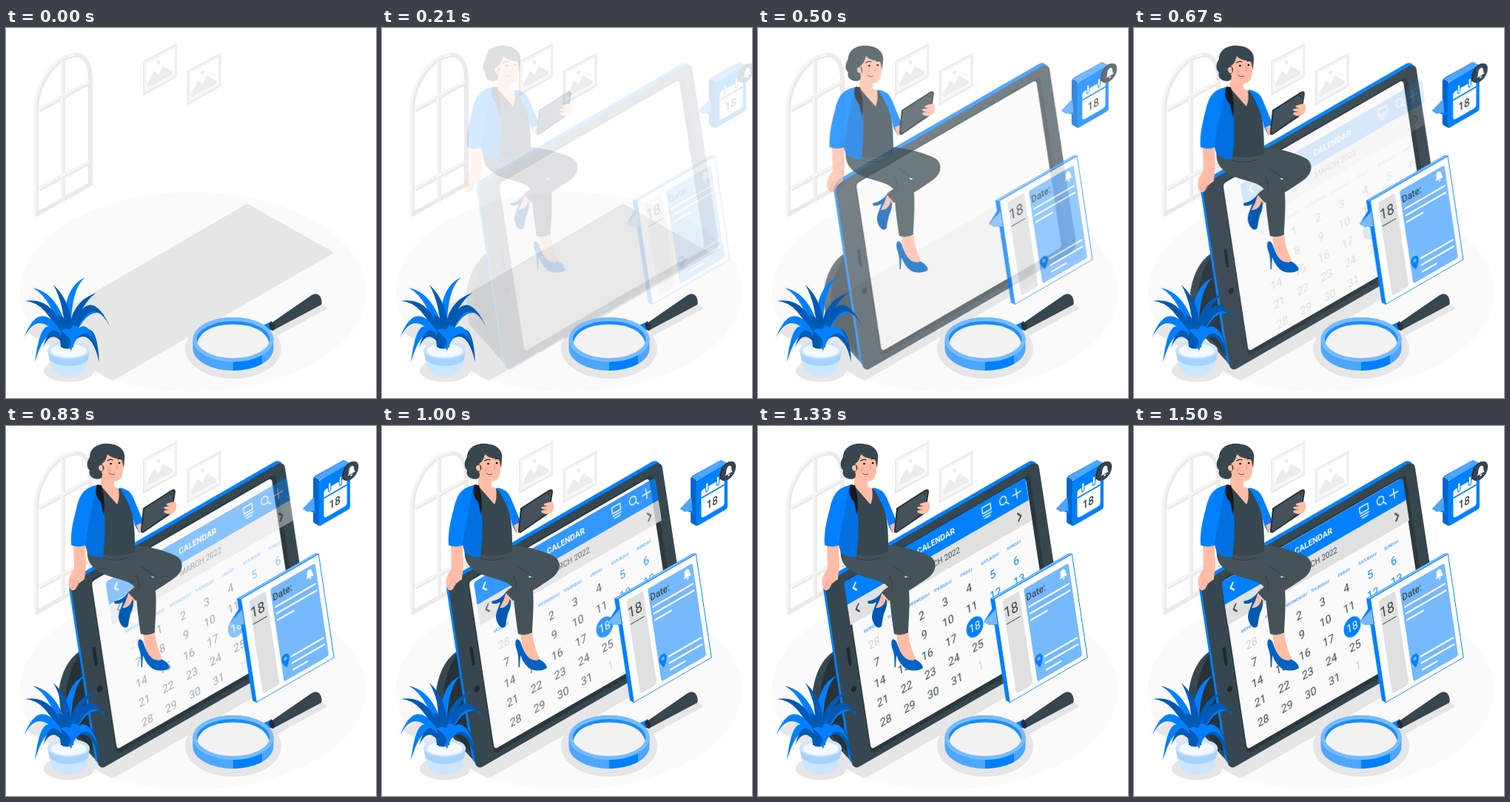
Animation, 500 px wide and 500 px high, one loop 1540 ms. Source, as an HTML page:

```html
<!DOCTYPE html>
<html lang="en">
<head>
<meta charset="utf-8">
<title>Calendar</title>
<style>
html, body { margin: 0; width: 100%; height: 100%; overflow: hidden; background: #fff; }
svg { display: block; width: 100%; height: 100%; font-family: Roboto, Inter, sans-serif; }
text { text-anchor: middle; dominant-baseline: central; fill: #37474f; }
.line { fill: none; stroke-linecap: round; stroke-linejoin: round; }
.b { fill: #0080ff; } .n { fill: #0059b3; } .d { fill: #37474f; } .c { fill: #435359; }
.s { fill: #ffbda7; } .l { fill: #77b9ff; } .w { fill: #fff; }
.in { animation: slide 1.54s linear infinite; }
.device { animation: device 1.54s linear infinite; }
.screen { animation: screen 1.54s linear infinite; }
@keyframes slide {
  0% { opacity: 0; transform: translateX(30px); animation-timing-function: cubic-bezier(.36,-.01,.5,1.38); }
  63%, 100% { opacity: 1; transform: none; }
}
@keyframes device {
  0%, 2% { opacity: 0; transform: translateX(45px); animation-timing-function: cubic-bezier(.36,-.01,.5,1.38); }
  67%, 100% { opacity: 1; transform: none; }
}
@keyframes screen {
  0%, 30.5% { opacity: 0; transform: translateX(30px); animation-timing-function: cubic-bezier(.36,-.01,.5,1.38); }
  95.5%, 100% { opacity: 1; transform: none; }
}
</style>
</head>
<body>
<svg viewBox="0 0 500 500">
  <defs>
    <path id="bell" d="M-6 4Q-4 2-4-1Q-4-6 0-6.500Q4-6 4-1Q4 2 6 4ZM-2 5H2Q1.500 7 0 7Q-1.500 7-2 5Z"/>
    <g id="photo">
      <path d="M185 45 231 20V66L185 92Z" fill="#ebebeb"/>
      <path d="M187 46 229 24V65L187 88Z" fill="#f5f5f5"/>
      <path d="M190 48 227 28V63L190 83Z" fill="#fff"/>
      <path d="M191 81V75L199 60Q201 57 204 62L206 64 211 53Q213 50 216 54L225 58V63Z" fill="#ececec"/>
      <ellipse cx="206" cy="47" rx="2.300" ry="2.800" fill="#ececec"/>
    </g>
  </defs>

  <!-- room -->
  <ellipse cx="252.500" cy="356.500" rx="234" ry="135" fill="#fafafa"/>
  <g class="line">
    <path d="M41 252V110C41 78 64 41 92 37C107 35 114 48 114 70V211Z" stroke="#ebebeb" stroke-width="6"/>
    <path d="M77 45V231M45 111 112 74M45 218 112 182" stroke="#ebebeb" stroke-width="6" stroke-linecap="butt"/>
    <path d="M39.500 252V109C39.500 76 64 39 92 36M75.500 46V231M45 109.500 112 72.500M45 216.500 112 180.500" stroke="#f5f5f5" stroke-width="3"/>
  </g>
  <use href="#photo"/>
  <use href="#photo" x="59.500" y="13"/>
  <path d="M322 239.500Q326 236.500 330 239.500L440 301.500Q443 303.500 440 305.500L148 474.500Q144 477 140 474.500L30 413Q27 411 30 409Z" fill="#e6e6e6"/>
  <g fill="#e6e6e6">
    <ellipse cx="85" cy="463" rx="34" ry="15.500"/>
    <ellipse cx="307" cy="433" rx="65" ry="41"/>
    <path d="M352 409 424 374Q434 373 433 380L365 417Z"/>
  </g>

  <!-- device -->
  <g class="device">
    <path class="d" d="M107 302C90 310 78 330 74 358L78 400 120 447 134 461Z"/>
    <path d="M107 302C96 316 86 336 84 362L88 405 120 440Z" fill="#263238"/>
    <g transform="matrix(.866 -.5 .15 .985 86.500 209.500)"><rect class="b" width="333" height="254" rx="11"/></g>
    <g transform="matrix(.866 -.5 .15 .985 90 213)">
      <rect class="d" width="333" height="256" rx="10"/>
      <rect x="29" y="11" width="289" height="238" rx="6" fill="#2b383e"/>
      <rect x="30.500" y="13" width="281" height="230" rx="5" fill="#fafafa"/>
      <g fill="#1f292e">
        <rect x="17" y="97" width="4.500" height="25" rx="2"/>
        <circle cx="19" cy="154" r="4"/>
      </g>
    </g>
  </g>

  <!-- calendar page -->
  <g class="screen">
    <g transform="matrix(.866 -.5 .15 .985 118 211)">
      <path class="b" d="M0 31V4Q0 0 4 0H279Q283 0 283 4V31Z"/>
      <rect y="31" width="283" height="28" fill="#e0e0e0"/>
      <text x="141" y="15" font-size="11.500" font-weight="700" style="fill:#fff">CALENDAR</text>
      <text x="141" y="44" font-size="10.800">MARCH 2022</text>
      <g class="line" stroke="#fff" stroke-width="1.400">
        <path d="M16.500 9 12 14 16.500 19" stroke-width="2.300"/>
        <path d="M260.500 14H273.500M267 7.500V20.500M250 17 254 21.500M214 7H227V15H214ZM214 18.500H227M216 22H225"/>
        <circle cx="246" cy="13" r="5.200"/>
      </g>
      <path class="line" d="M16 38 11.500 43 16 48M264 40 268.500 45 264 50" stroke="#37474f" stroke-width="2"/>
      <g id="days"></g>
    </g>
  </g>

  <!-- woman -->
  <g class="in">
    <!-- far leg -->
    <path class="s" d="M170 219 181 229 172 244 159 252 160 238Z"/>
    <path class="n" d="M148 237Q160 235 168 224L164 236 159 246Q170 246 173 233Q176 242 170 254 168 262 167 270Q163 276 157 268 151 258 157 246L160 238Q154 241 149 240Z"/>
    <path class="c" d="M160 162C180 158 218 168 234 177C243 184 241 197 230 205C216 215 202 224 190 230L177 236 167 225C178 214 190 208 203 204L178 196Z"/>
    <!-- near leg -->
    <path class="s" d="M187 279 203 276Q204 296 213 314L200 322Q190 310 187 279Z"/>
    <path d="M181 289Q186 286 189 297 195 314 204 316 210 318 212 315 222 320 223 327 214 333 202 329 193 325 187 310L186 326H184.500Q185 310 182 302 179 295 181 289Z" fill="#0062c4"/>
    <path class="c" d="M112 166C110 183 118 193 136 201C155 208 175 210 177 221C179 245 181 262 184 281Q195 284 203 279C204 255 207 224 201 210C197 196 187 188 177 178L174 160Z"/>
    <path class="line" d="M133 179Q152 184 166 178M201 203Q194 196 184 190M178 202Q183 212 181 222" stroke="#2c3a41" stroke-width=".8"/>
    <!-- body -->
    <path class="s" d="M131 66 148 70V82L159 86 153 108 129 86Z"/>
    <path class="d" d="M131 82 152 106Q156 98 154 84L165 88C172 103 177 135 176 170Q152 178 131 173Z"/>
    <path class="s" d="M93 158 94 193C88 200 84 211 88 219C92 225 96 222 100 213L108 207 110 190 109 158Z"/>
    <path class="line" d="M91 219Q92 212 96 207M96 220Q97 214 100 210" stroke="#e89a84" stroke-width=".8"/>
    <path d="M124 80C114 96 108 120 109 161L112 171Q122 179 133 177C137 145 137 111 130 82Z" fill="#0070e0"/>
    <path class="b" d="M124 80C106 84 101 94 97 112C92 130 89 145 90 161Q100 165 109 161C112 140 116 120 119 104Z"/>
    <path d="M125 79Q120 92 130 103L134 121Q137 102 131 80Z" fill="#151b1f"/>
    <path class="b" d="M155 83Q169 85 174 97L186 126Q187 139 182 145L176 134Q172 108 155 83Z"/>
    <!-- tablet in hand -->
    <path class="s" d="M178 134 188 130 190 141 182 145Z"/>
    <path d="M187 111 226 86Q231 84 231 89L227 114Q226 118 223 120L188 144Q184 146 184 141Z" fill="#263238"/>
    <path class="c" d="M189 112 226 88Q229 87 229 90L225 114 222 118 188 142Q186 143 186 140Z"/>
    <circle cx="225" cy="92" r="1" fill="#151b1f"/>
    <path class="s" d="M231 102Q234 112 229 117 222 121 216 117 214 115 217 114L223 113Q215 113 215 110 218 108 224 109 217 107 219 105 224 103 231 102Z"/>
    <!-- head -->
    <path class="s" d="M130 41Q146 33 159 42 162 58 158 69 153 77 143 74 133 71 128 60Z"/>
    <path class="d" d="M131 70C124 75 112 69 115 60C110 55 111 48 115 42C115 29 128 22 142 24C156 25 164 34 162 45L161 57 158 44C151 45 143 42 139 38C137 48 133 49 131 52C135 52 136 60 131 62Q133 66 131 70Z"/>
    <path class="s" d="M132 53Q127 52 127 57 129 63 133 60Z"/>
    <g class="line" stroke="#263238">
      <path d="M139 47Q143 44 146 46M153 45Q156 43 158 45" stroke-width="1.300"/>
      <path d="M141 64Q145 67 149 65" stroke="#a34a3f"/>
      <path d="M151 51 153 57 150 58" stroke="#e58f79" stroke-width=".8"/>
    </g>
    <circle cx="143.500" cy="51" r="1.300"/><circle cx="155" cy="50" r="1.300"/>
    <circle cx="141" cy="59" r="3" fill="#ff9f8a" opacity=".5"/>
  </g>

  <!-- date card -->
  <g class="in">
    <path class="b" d="M314 233 420 172 425 173 320 234 341 374 335 371Z"/>
    <path class="l" d="M314 233 420 172 425 173 320 234Z"/>
    <path class="b" d="M317 246 324 250 323 270 305 265Z"/>
    <path class="l" d="M305 265 321 248 324 268 312 269Z"/>
    <g transform="matrix(.866 -.5 .147 .985 319.500 233.500)">
      <rect width="121" height="142" fill="#fff" stroke="#0080ff"/>
      <rect x="11" y="8" width="26" height="128" rx="3" fill="#e0e0e0"/>
      <rect class="l" x="44" y="9" width="70" height="127" rx="3"/>
      <text x="21.500" y="26" font-size="19.500">18</text>
      <path class="line" d="M12 41H33" stroke="#37474f"/>
      <text x="61" y="22" font-size="13" font-weight="500">Date:</text>
      <use class="w" href="#bell" x="104" y="19"/>
      <path class="line" stroke="#fff" stroke-width="2.300" d="M48 35.500H110M48 44.500H110M48 53.500H73M60 109.500H110M60 118.500H110M60 127.500H82"/>
      <path class="b" fill-rule="evenodd" d="M51 120Q45 112 45 108A6 6 0 0 1 57 108Q57 112 51 120ZM51 105.500A2.500 2.500 0 1 0 51 110.500A2.500 2.500 0 1 0 51 105.500Z"/>
    </g>
  </g>

  <!-- reminder -->
  <g class="in">
    <path d="M417 72Q417 69 420 67L458 46 466 50 425 73V135L418 131Q417 130 417 128Z" fill="#0066cc"/>
    <path d="M418 69 458 46 466 50 425 73Z" fill="#4da6ff"/>
    <path class="b" d="M403 112 418 96 421 118Z"/>
    <path d="M403 112 418 96 419 114 409 116Z" fill="#4da6ff"/>
    <g transform="matrix(.866 -.5 0 1 424.500 74)">
      <rect class="b" width="49" height="62" rx="3"/>
      <rect class="w" x="8" y="17" width="36" height="38" rx="4"/>
      <path d="M8 27.500H44" stroke="#0080ff" stroke-width="2"/>
      <path class="line" d="M17 14V21M34 14V21" stroke="#0080ff" stroke-width="5"/>
      <path class="line" d="M17 13V21M34 13V21" stroke="#fff" stroke-width="2.500"/>
      <text x="25" y="42" font-size="15.500" font-weight="500">18</text>
    </g>
    <g transform="matrix(.866 -.5 0 1 467 60.500)">
      <circle cx="-1" r="11.500" fill="#263238"/>
      <circle cx="1.500" cy="1" r="11.500" class="d"/>
      <use class="w" href="#bell" x="2" y="1"/>
    </g>
  </g>

  <!-- plant -->
  <path d="M56 435 61 457Q64 470 85 471 105 470 109 457L113 435Z" fill="#cce6ff"/>
  <path d="M56 435 59 449Q70 457 85 457 101 457 111 449L113 435Z" fill="#a6d2ff"/>
  <ellipse cx="84.500" cy="435" rx="28.500" ry="12" fill="#cce6ff"/>
  <ellipse cx="84.500" cy="436" rx="24" ry="9" fill="#f2f9ff"/>
  <path class="n" d="M72 410H93L91 431Q82 436 74 431Z"/>
  <g id="leaves"></g>

  <!-- magnifier -->
  <path class="b" d="M349 401 358 397 364 406 352 410Z"/>
  <path class="d" d="M355 401 413 361Q420 357 424 362 428 368 426 374L362 408Q359 410 357 406Z"/>
  <path d="M355 401 358 396 364 402 362 408Q359 410 357 406Z" fill="#263238"/>
  <path fill-rule="evenodd" fill="#4da6ff" d="M252.500 421A54.500 30 0 0 1 361.500 421V433A54.500 30 0 0 1 252.500 433ZM259 421A48 25 0 0 0 355 421A48 25 0 0 0 259 421Z"/>
  <path class="b" d="M307 451Q331 450 346 441V454Q331 462 307 463Z"/>
  <ellipse cx="307" cy="421" rx="50" ry="26" fill="#1a8cff"/>
  <path d="M258 426Q265 401 307 400.500 349 401 356 426 349 446.500 307 448 265 446.500 258 426Z" fill="#f2f2f2"/>
  <ellipse class="line" cx="307" cy="421" rx="51.800" ry="27.500" stroke="#77bbff" stroke-width="5"/>
</svg>
<script>
const put = (id, markup) => { document.getElementById(id).innerHTML = markup; };
const label = (x, y, size, fill, text) =>
  `<text x="${x}" y="${y}" font-size="${size}" style="fill:${fill}">${text}</text>`;

const names = ['MON', 'TUES', 'WEDNES', 'THURS', 'FRI', 'SATUR', 'SUN'];
const colX = i => 30 + 37 * i;
let page = names.map((n, i) => label(colX(i), 76.5, 5.8, '#0080ff', n + 'DAY')).join('');
for (let i = 0; i < 35; i++) {
  const x = colX(i % 7), y = 99 + 26.4 * Math.floor(i / 7);
  const day = i === 0 ? 28 : i > 31 ? i - 31 : i;
  const outside = i === 0 || i > 31;
  if (day === 18) page += `<circle class="b" cx="${x}" cy="${y}" r="13"/>`;
  const fill = outside ? '#d0d0d0' : day === 18 ? '#fff' : i % 7 > 4 ? '#0080ff' : '#37474f';
  page += label(x, y, 15.5, fill, day);
}
put('days', page);

// base x, base y, bend x, bend y, tip x, tip y, half width
const blue = '#0080ff', navy = '#0059b3';
const leaf = ([bx, by, cx, cy, tx, ty, w], fill) => {
  const dx = tx - bx, dy = ty - by, k = w / Math.hypot(dx, dy), nx = -dy * k, ny = dx * k;
  return `<path fill="${fill}" d="M${bx - nx * .8} ${by - ny * .8}Q${cx - nx} ${cy - ny} ${tx} ${ty}` +
    `Q${cx + nx} ${cy + ny} ${bx + nx * .8} ${by + ny * .8}Z"/>`;
};
put('leaves', [
  [83, 422, 80, 352, 107, 337, 6], [84, 420, 86, 374, 64, 347, 6],
  [80, 420, 68, 362, 36, 351, 6], [88, 418, 92, 372, 122, 358, 6],
  [86, 424, 104, 368, 134, 388, 6], [78, 420, 60, 366, 26, 369, 6],
  [78, 422, 46, 368, 24, 419, 7], [88, 420, 112, 345, 142, 406, 7],
  [77, 424, 53, 382, 39, 452, 8], [90, 424, 118, 390, 126, 452, 8],
  [88, 428, 106, 388, 123, 428, 7], [80, 428, 62, 396, 50, 432, 6],
  [85, 431, 92, 390, 108, 418, 8], [82, 430, 80, 392, 70, 388, 7]
].map((l, i) => leaf(l, i % 2 ? navy : blue)).join('') +
  `<path fill="${blue}" d="M74 409Q86 402 92 416L90 432Q88 417 74 409Z"/>`);
</script>
</body>
</html>
```
